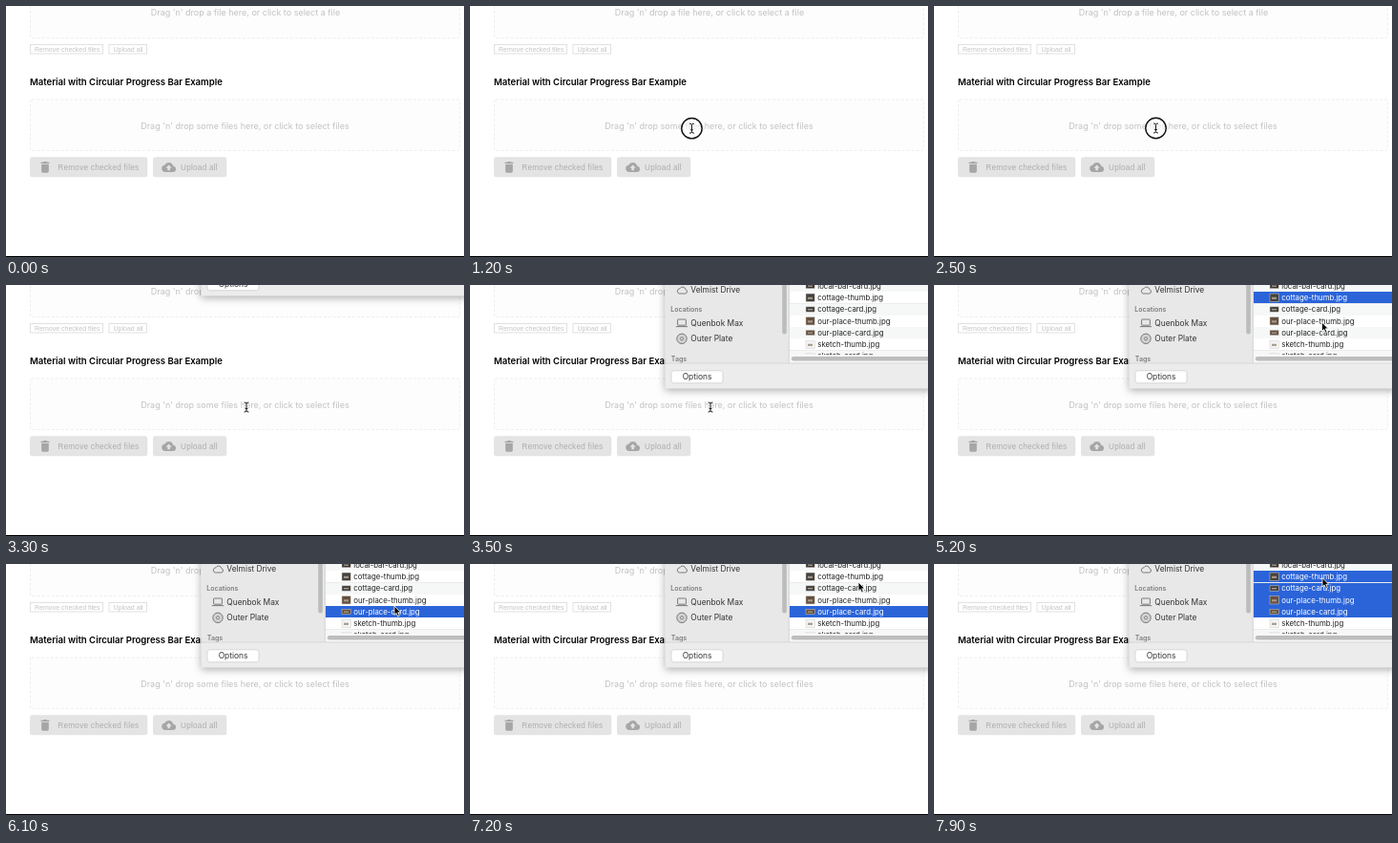
These frames come from a looping animation (480x263 px, 8000 ms). An HTML page:

```html
<!DOCTYPE html>
<html lang="en">
<head>
<meta charset="utf-8">
<title>File upload demo</title>
<style>
  html, body { margin: 0; width: 100%; height: 100%; overflow: hidden; background: #fff; }
  svg { display: block; width: 480px; height: 263px; }
  text { font-family: Inter, "Open Sans", sans-serif; white-space: pre; }
  .zone { fill: #fdfdfd; stroke: #eee; stroke-dasharray: 3 2; }
  .hint { font-size: 9px; fill: #c2c2c2; text-anchor: middle; }
  .title { font-size: 9.55px; font-weight: 600; fill: #000; }
  .plain rect { fill: #fff; stroke: #dadada; stroke-width: .8; }
  .plain text { font: 7px "Liberation Sans", Arial, sans-serif; fill: #c4c4c4; }
  .raised rect { fill: #e4e4e4; }
  .raised text { font: 8.2px "Liberation Sans", Arial, sans-serif; letter-spacing: .25px; fill: #adadad; }
  .raised path { fill: #a6a6a6; }
  .sheet { filter: drop-shadow(0 2px 4px rgba(0, 0, 0, .32)); }
  .group { font-size: 7px; font-weight: 600; fill: #7d7d7d; }
  .place { font-size: 8.4px; fill: #333; }
  .icon { fill: none; stroke: #6e6e6e; stroke-width: .9; }
  .name { font-size: 7.8px; fill: #222; }
  .bar { fill: #fff; shape-rendering: crispEdges; }
  .row:nth-child(even) .bar { fill: #f6f8f8; }
  .row.on .bar { fill: #2b64d9; }
  .row.on .name { fill: #fff; }
</style>
</head>
<body>
<svg viewBox="0 0 480 263">
  <defs>
    <clipPath id="list"><rect x="334.5" y="-30" width="146" height="103"/></clipPath>
    <path id="caret" d="M-2.4-5Q0-5 0-3.6Q0-5 2.4-5M0-3.6V3.6M-2.4 5Q0 5 0 3.6Q0 5 2.4 5M-1.3 1.5H1.3"/>
  </defs>
  <rect width="480" height="263" fill="#fff"/>

  <rect class="zone" x="25.5" y="-20" width="450" height="53.5" rx="1.5"/>
  <text class="hint" x="251" y="10.3">Drag 'n' drop a file here, or click to select a file</text>
  <g class="plain">
    <rect x="25.5" y="40.5" width="76" height="9.5"/>
    <text x="30" y="47.8">Remove checked files</text>
    <rect x="108" y="40.5" width="39.5" height="9.5"/>
    <text x="112.5" y="47.8">Upload all</text>
  </g>

  <text class="title" x="25" y="83.3">Material with Circular Progress Bar Example</text>
  <rect class="zone" x="25.5" y="98" width="450" height="53.5" rx="1.5"/>
  <text class="hint" x="250.5" y="128.8">Drag 'n' drop some files here, or click to select files</text>
  <g class="raised">
    <rect x="25" y="158.3" width="123.3" height="21" rx="2.5"/>
    <path transform="translate(33.3 161.2) scale(.64)" d="M6 19c0 1.1.9 2 2 2h8c1.1 0 2-.9 2-2V7H6v12zM19 4h-3.5l-1-1h-5l-1 1H5v2h14V4z"/>
    <text x="54.3" y="172">Remove checked files</text>
    <rect x="154" y="158.3" width="77.3" height="21" rx="2.5"/>
    <path transform="translate(163.2 161.6) scale(.62)" d="M19.35 10.04C18.67 6.59 15.64 4 12 4 9.11 4 6.6 5.64 5.35 8.04 2.34 8.36 0 10.91 0 14c0 3.31 2.69 6 6 6h13c2.76 0 5-2.24 5-5 0-2.64-2.05-4.78-4.65-4.96zM14 13v4h-4v-4H7l5-5 5 5h-3z"/>
    <text x="183" y="172">Upload all</text>
  </g>

  <rect y="262" width="480" height="1" fill="#000"/>

  <g id="dialog">
    <rect class="sheet" x="204.5" y="-30" width="300" height="138.5" fill="#ececec"/>
    <rect x="204.5" y="-30" width="129.5" height="112" fill="#e8e8e8"/>
    <rect x="327.2" y="-30" width="4.6" height="81.5" rx="2.3" fill="#bcbcbc"/>

    <path class="icon" d="M219 9h6.5a2.2 2.2 0 0 0 .4-4.3a3.2 3.2 0 0 0-6-.9a2.7 2.7 0 0 0-.9 5.2z"/>
    <text class="place" x="231.3" y="8.2">Velmist Drive</text>
    <text class="group" x="210.3" y="27.6">Locations</text>
    <g class="icon">
      <rect x="217.6" y="36" width="8.8" height="6.2" rx=".6"/>
      <path d="M215.8 43.6h12.4"/>
      <circle cx="222" cy="56.3" r="5.2" fill="#d2d2d2"/>
      <circle cx="222" cy="56.3" r="1.5" fill="#eee"/>
    </g>
    <text class="place" x="231.3" y="43">Quenbok Max</text>
    <text class="place" x="231.3" y="59.4">Outer Plate</text>
    <text class="group" x="210.8" y="79.6">Tags</text>

    <g id="files" clip-path="url(#list)"></g>
    <rect x="334.5" y="73" width="146" height="8.5" fill="#f7f7f7"/>
    <rect x="336.8" y="75" width="160" height="4.6" rx="2.3" fill="#bdbdbd"/>
    <path d="M334.3-30V82M204.5 82H480" stroke="#d2d2d2" stroke-width=".8"/>

    <rect x="211" y="89.8" width="54" height="13" rx="2.6" fill="#fff" stroke="#cacaca" stroke-width=".7"/>
    <text class="place" x="238" y="99.3" text-anchor="middle">Options</text>
  </g>

  <g id="pointer">
    <circle id="ring" fill="#fff" fill-opacity=".5" stroke="#111" stroke-width="1.4"/>
    <path id="arrow" d="M0 0V9.4L2.1 7.4L3.6 11L5.3 10.3L3.8 6.8H6.7Z" stroke="#fff" stroke-width=".8"/>
    <g id="beam" fill="none">
      <use href="#caret" stroke="#fff" stroke-width="2"/>
      <use href="#caret" stroke="#111"/>
    </g>
  </g>
</svg>

<script>
const LOOP = 8000, STEP = 100;
const $ = id => document.getElementById(id);
const rowY = i => 1 + 12.25 * (i - 1);

// Each picture comes as a square thumb and a wide card.
const tones = { "local-bar": "#3a3532", cottage: "#45423e", "our-place": "#66503f", sketch: "#f4f4f4" };

function fileRow(name, kind, tone, i) {
  const y = rowY(i), h = kind === "thumb" ? 8.4 : 5.4;
  return `<g class="row">
    <rect class="bar" x="334.5" y="${y - 6}" width="146" height="12"/>
    <rect x="352" y="${y - h / 2}" width="9.2" height="${h}" fill="${tone}" stroke="#ccc" stroke-width=".5"/>
    <rect x="354" y="${y - .5}" width="5" height="${h / 4}" fill="#a89a8a"/>
    <text class="name" x="364.3" y="${y + 2.9}">${name}-${kind}.jpg</text></g>`;
}

$("files").innerHTML = Object.entries(tones)
  .flatMap(([name, tone]) => ["thumb", "card"].map(kind => [name, kind, tone]))
  .map((file, i) => fileRow(...file, i)).join("");
const rows = [...document.querySelectorAll(".row")];

// The pointer rests between moves.
const home = { x: 219, y: 212 };
const moves = [
  { from: 400, to: 800, x: 229, y: 141 },
  { from: 900, to: 1300, x: 232.5, y: 128 },
  { from: 3100, to: 3300, x: 252, y: 128 },
  { from: 3600, to: 4000, x: 461, y: 11.5 },
  { from: 4100, to: 4500, x: 406, y: 10 },
  { from: 4700, to: 4800, x: 408, y: 18 },
  { from: 4900, to: 5200, x: 406.5, y: 39 },
  { from: 5300, to: 5700, x: 407, y: 44 },
  { from: 6700, to: 7200, x: 407, y: 19 },
  { from: 7800, to: 7900, x: 407, y: 14.5 }
];
const clicks = [
  { from: 1200, to: 1600 },
  { from: 2500, to: 2600 },
  { from: 4800, to: 5000, first: 2, last: 2 },
  { from: 5900, to: 6000, first: 5, last: 5 },
  { from: 7500, to: 7800, first: 2, last: 5 }
];

const progress = (t, from, to) => Math.min(1, Math.max(0, (t - from) / (to - from)));
const easeIn = p => p ** 3;
const easeOut = p => 1 - (1 - p) ** 3;
const show = (el, on) => el.setAttribute("visibility", on ? "visible" : "hidden");
const place = (el, x, y) => el.setAttribute("transform", `translate(${x} ${y})`);

function pointerAt(t) {
  return moves.reduce((pos, m) => {
    const p = easeOut(progress(t, m.from, m.to));
    return { x: pos.x + (m.x - pos.x) * p, y: pos.y + (m.y - pos.y) * p };
  }, home);
}

function draw(t) {
  const { x, y } = pointerAt(t);
  const overText = t >= 700 && t < 3700;
  place($("pointer"), x, y);
  show($("arrow"), t >= 500 && !overText);
  show($("beam"), overText);

  const press = clicks.find(c => t >= c.from && t < c.to);
  show($("ring"), press);
  if (press) $("ring").setAttribute("r", 10.7 + 4 * progress(t, press.from, press.from + STEP));

  show($("dialog"), t >= 3200);
  place($("dialog"), 0, -111 * (1 - easeIn(progress(t, 3100, 3500))));

  const pick = clicks.findLast(c => c.first && t >= c.from);
  rows.forEach((row, i) => row.classList.toggle("on", !!pick && i >= pick.first && i <= pick.last));
}

const start = performance.now();
function tick() {
  const t = (performance.now() - start) % LOOP;
  draw(Math.floor(t / STEP) * STEP);
  requestAnimationFrame(tick);
}
tick();
</script>
</body>
</html>
```
